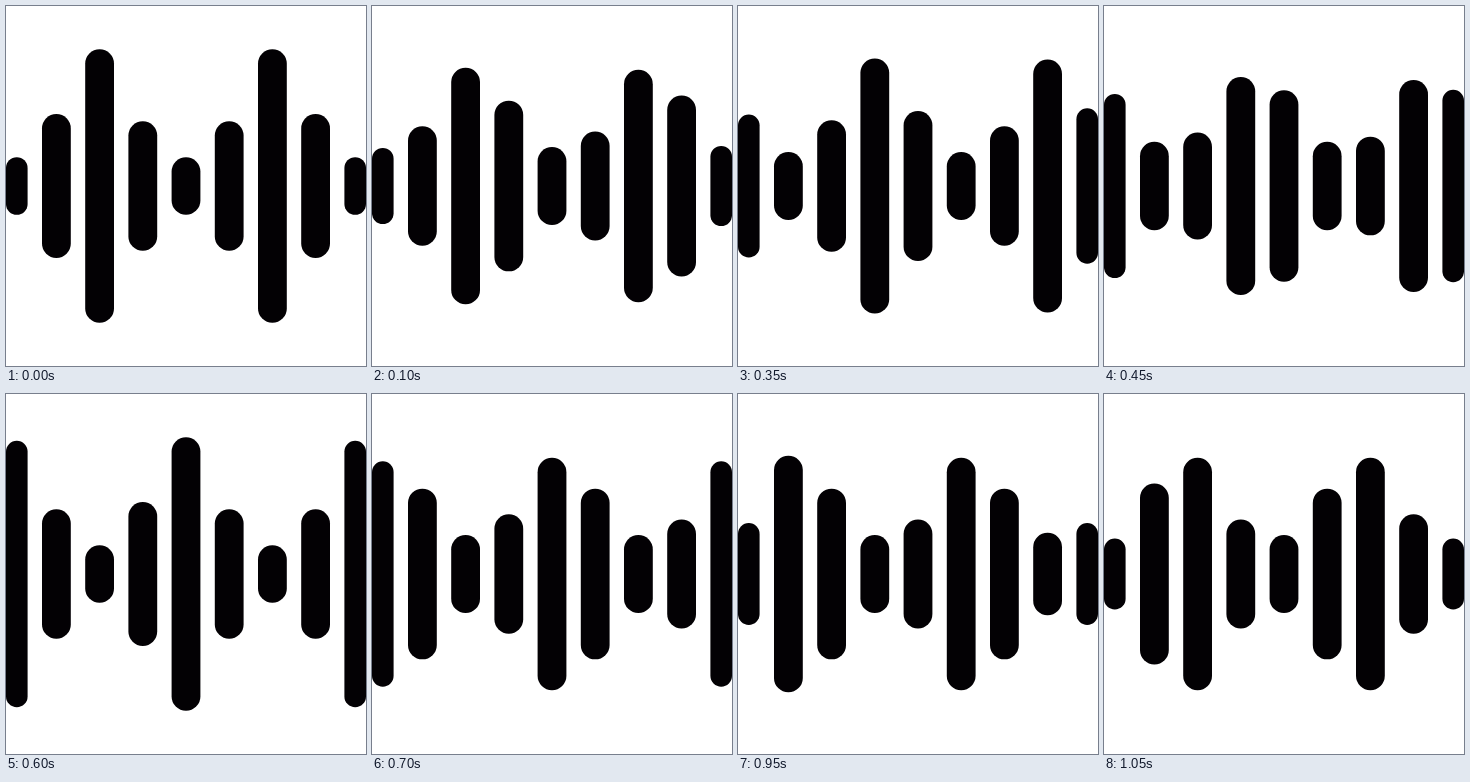
Animation, 360 px wide and 360 px high, one loop 1.1 s. Source, as an HTML page:

```html
<!DOCTYPE html>
<html lang="en">
<head>
<meta charset="utf-8">
<title>Sound wave</title>
<style>
  html, body { margin: 0; width: 100%; height: 100%; overflow: hidden; background: #fff; }
  svg { display: block; width: 100%; height: 100%; fill: #030104; }
</style>
</head>
<body>
<svg id="wave" viewBox="0 0 360 360"></svg>
<script>
  const UNIT = 14.4, PITCH = 3 * UNIT, MID = 180;
  const TICK = 50, RISE = 12, FALL = 10; // ticks in each half of the loop
  const STEPS = 7;                       // steps between two poses

  // Bar heights in units, one row per pose; the outer bars are narrower.
  const poses = [
    [4, 10, 19, 9, 4, 9, 19, 10, 4],
    [8.5, 4, 10, 19, 9, 4, 9, 19, 9.5],
    [18.5, 9, 4, 10, 19, 9, 4, 9, 18.5],
    [8.5, 19, 9, 4, 9, 19, 9, 4, 8.5],
    [3.5, 10, 19, 9, 4, 9, 19, 10, 3.5]
  ];

  const wave = document.getElementById('wave');
  const bars = poses[0].map((_, i) => {
    const bar = document.createElementNS('http://www.w3.org/2000/svg', 'rect');
    const left = Math.max(0, MID + (i - 4) * PITCH - UNIT);
    const right = Math.min(360, MID + (i - 4) * PITCH + UNIT);
    bar.setAttribute('x', left);
    bar.setAttribute('width', right - left);
    bar.setAttribute('rx', (right - left) / 2);
    return wave.appendChild(bar);
  });

  // Both halves cover the same steps, the second one in fewer ticks.
  function stepAt(ms) {
    const tick = Math.floor(ms / TICK) % (RISE + FALL);
    const half = 2 * STEPS;
    return tick < RISE
      ? Math.floor(half * tick / RISE)
      : half + Math.floor(half * (tick - RISE) / FALL);
  }

  function draw(ms) {
    const step = stepAt(ms);
    const pose = Math.floor(step / STEPS);
    const mix = step % STEPS / STEPS;
    bars.forEach((bar, i) => {
      const from = poses[pose][i], to = poses[pose + 1][i];
      const height = UNIT * (from + (to - from) * mix);
      bar.setAttribute('y', MID - height / 2);
      bar.setAttribute('height', height);
    });
  }

  const start = performance.now();
  function loop() {
    draw(performance.now() - start);
    requestAnimationFrame(loop);
  }
  loop();
</script>
</body>
</html>
```
